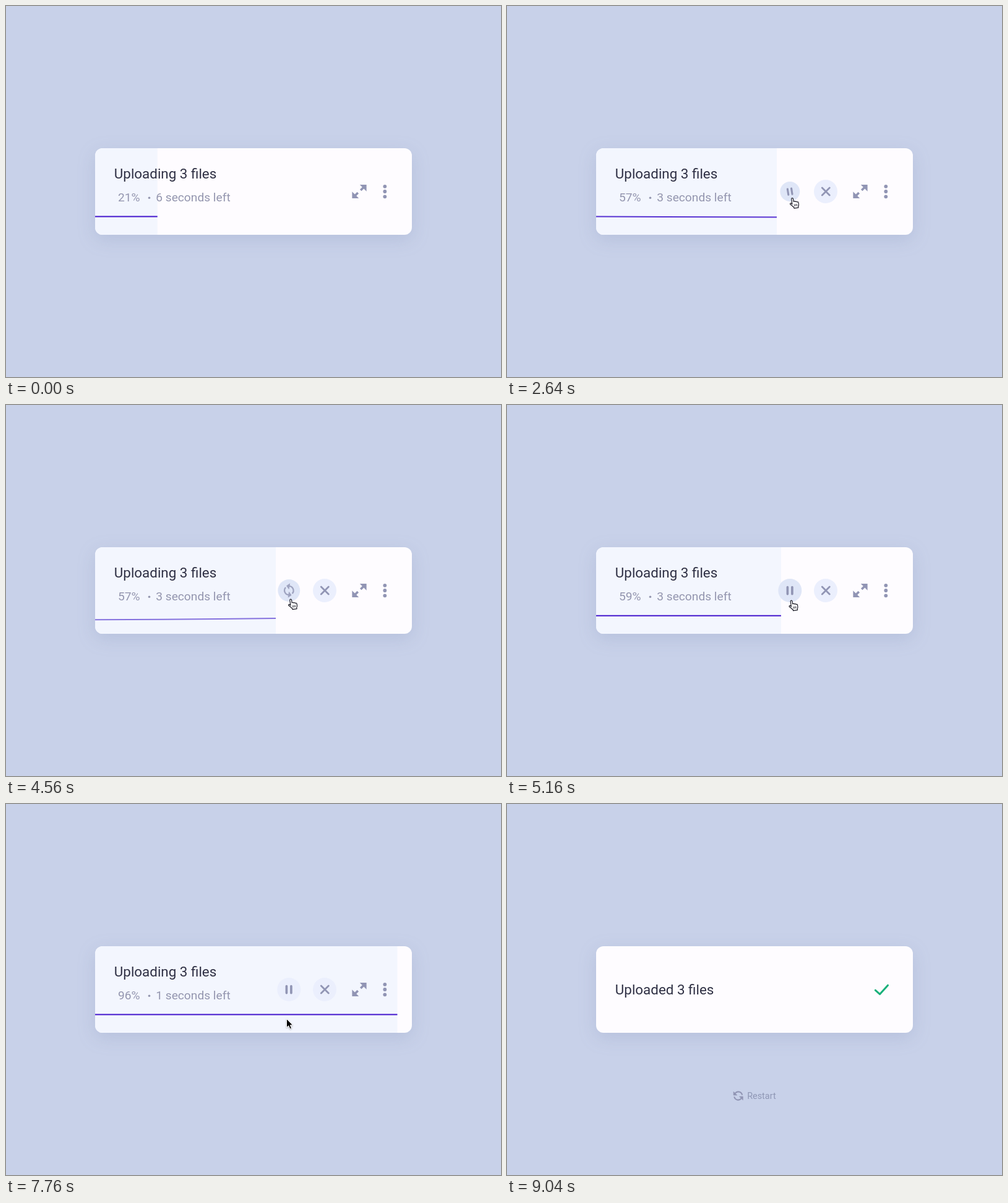
An HTML page for the animation above (9520 ms loop, 800 by 600 pixels).

```html
<!DOCTYPE html>
<html lang="en">
<head>
<meta charset="utf-8">
<title>Upload progress card</title>
<style>
  html, body { margin: 0; width: 100%; height: 100%; overflow: hidden; background: #c8d1e9; }
  svg { display: block; width: 800px; height: 600px; }
  text { font-family: Roboto, sans-serif; white-space: pre; }
  .shadow { filter: drop-shadow(0 8px 14px rgba(95, 110, 160, .17)); }
  .title { font-size: 22.4px; fill: #2f3044; }
  .sub { font-size: 19.2px; fill: #9496af; }
  .icon { fill: #9195b4; }
  .stroke { fill: none; stroke: #9195b4; stroke-linecap: round; }
  #arrow { filter: drop-shadow(0 1px 1px rgba(0, 0, 0, .3)); }
</style>
</head>
<body>
<svg viewBox="0 0 800 600">
  <defs>
    <clipPath id="cardClip"><rect x="144" y="230" width="512" height="140" rx="12"/></clipPath>
    <g id="half">
      <path d="M-8.8 -7.8V-1.3H-2.2Z" class="icon" stroke="#9195b4" stroke-width=".8" stroke-linejoin="round"/>
      <path d="M-6 -4.6A7.6 7.6 0 0 1 7.5 -1.6" class="stroke" stroke-width="2.4" style="stroke-linecap:butt"/>
    </g>
    <g id="sync"><use href="#half"/><use href="#half" transform="rotate(180)"/></g>
    <g id="expandArrow">
      <path d="M.8 -11H11.6V-.2Z" class="icon"/>
      <path d="M2.2 -2L8 -7.8" class="stroke" stroke-width="3.6" style="stroke-linecap:butt"/>
    </g>
  </defs>

  <rect class="shadow" x="144" y="230" width="512" height="140" rx="12" fill="#fefcff"/>

  <g id="uploading">
    <g clip-path="url(#cardClip)">
      <rect id="fill" x="144" y="230" height="140" fill="#f3f6fe"/>
      <path id="line" fill="none" stroke-width="2"/>
    </g>
    <text class="title" x="174.8" y="279">Uploading 3 files</text>
    <text id="percent" class="sub" x="181" y="316.2"></text>
    <circle cx="231.5" cy="310.3" r="1.8" fill="#9496af"/>
    <text id="status" class="sub" x="242.2" y="316.2"></text>

    <g id="buttons">
      <g id="toggle">
        <circle id="toggleDisc" r="19"/>
        <g id="pauseIcon" class="stroke" stroke-width="3.7">
          <path d="M-3.9 -5.4V5.6M3.6 -5.4V5.6"/>
        </g>
        <use id="syncIcon" href="#sync"/>
      </g>
      <circle cx="515" cy="300" r="19" fill="#ebeffd"/>
      <path d="M509.3 294L521.3 306M521.3 294L509.3 306" class="stroke" stroke-width="2.7"/>
    </g>

    <g transform="translate(571 300)">
      <use href="#expandArrow"/><use href="#expandArrow" transform="rotate(180)"/>
    </g>
    <g class="icon">
      <circle cx="612.3" cy="291.8" r="2.9"/>
      <circle cx="612.3" cy="300" r="2.9"/>
      <circle cx="612.3" cy="308.3" r="2.9"/>
    </g>
  </g>

  <g id="uploaded">
    <text class="title" x="174.8" y="308">Uploaded 3 files</text>
    <path id="check" d="M595.3 301.2L602.6 307.6L615.5 293.2" pathLength="1" stroke-dasharray="1 2"
      fill="none" stroke="#18b07a" stroke-width="3" stroke-linecap="round" stroke-linejoin="round"/>
  </g>

  <g id="restart">
    <use href="#sync" transform="translate(373.7 472) scale(.86)"/>
    <text x="388.2" y="477.2" font-size="14.4" fill="#8f97b5">Restart</text>
  </g>

  <g id="cursor">
    <path id="arrow" d="M0 0V14L3.2 11.1L5.5 16.2L8 15.1L5.8 10.2H10Z" stroke="#fff" stroke-width="1"/>
    <g id="hand" transform="rotate(-8) translate(-4.6 0)" stroke="#1b1b26" stroke-width="1.2" stroke-linejoin="round">
      <path fill="#fff" d="M4 10.6V2.2Q4 .7 5.4 .7Q6.8 .7 6.8 2.2V6.6Q9 5.7 9.6 7.3Q11.7 6.6 12.2 8.2Q14.4 7.6 14.4 9.7V12Q14.4 14 13.2 15.5V17.5H6.2V16Q4.4 14.6 3.3 12.6L.9 10.3Q.6 8.7 2 8.5Q3 8.6 4 10.6Z"/>
      <path fill="none" stroke-width=".8" d="M7.3 11V14.5M9.3 11V14.5M11.3 11V14.5"/>
    </g>
  </g>
</svg>
<script>
  const LOOP = 9520, STEP = 40;
  const RATE = 0.01424;            // percent per ms
  const PAUSE = 2523, RESUME = 4965;
  const PAUSE_RELEASE = 2610, RESUME_RELEASE = 4420;
  const DONE = 8080;

  const el = {};
  document.querySelectorAll('svg [id]').forEach(node => el[node.id] = node);

  const clamp = x => Math.min(1, Math.max(0, x));
  const ramp = (t, from, to) => clamp((t - from) / (to - from));
  const smooth = x => x * x * (3 - 2 * x);
  const easeOut = x => 1 - (1 - x) ** 1.7;
  const linear = x => x;
  const mix = (a, b, k) => a + (b - a) * k;
  const mixColor = (a, b, k) => `rgb(${a.map((c, i) => Math.round(mix(c, b[i], k)))})`;
  const fade = (node, opacity) => node.setAttribute('opacity', opacity);

  // Underdamped spring from 0 to 1, starting at rest.
  function spring(ms) {
    if (ms <= 0) return 0;
    const s = ms / 1000, k = 5.2, w = 10.5;
    return 1 - Math.exp(-k * s) * (Math.cos(w * s) + k / w * Math.sin(w * s));
  }

  function progress(t) {
    const active = Math.min(t, PAUSE) + Math.max(0, t - RESUME);
    return Math.min(100, 21.1 + RATE * active);
  }

  // time, x, y, easing of the way to this point
  const path = [
    [960, 788, 342, linear], [1200, 687, 341.5, linear], [1800, 459, 314, easeOut],
    [2250, 459, 314, linear], [2440, 460, 310, smooth], [2640, 460, 310, linear],
    [2800, 459, 314, smooth], [4060, 459, 314, linear], [4280, 460, 310, smooth],
    [4440, 460, 310, linear], [4640, 458.5, 315.5, smooth], [5400, 458.5, 315.5, linear],
    [6200, 453.5, 347.5, smooth], [8200, 453.5, 347.5, linear], [9000, 772, 369, smooth]
  ];

  function cursorAt(t) {
    const next = path.findIndex(p => p[0] > t);
    if (next === 0) return path[0].slice(1, 3);
    if (next < 0) return path[path.length - 1].slice(1, 3);
    const [t0, x0, y0] = path[next - 1], [t1, x1, y1, ease] = path[next];
    const k = ease(ramp(t, t0, t1));
    return [mix(x0, x1, k), mix(y0, y1, k)];
  }

  function drawProgress(t) {
    const value = progress(t);
    const width = 5.12 * progress(t - 100);
    const paused = t > 2660 && t < 4460;
    const seconds = Math.max(1, Math.ceil((100 - value) / 14.35));
    el.percent.textContent = Math.floor(value) + '%';
    el.status.textContent = paused ? 'Paused' : seconds + ' seconds left';
    el.fill.setAttribute('width', width);

    const drop = lag => spring(t - PAUSE_RELEASE - lag) - spring(t - RESUME_RELEASE - lag);
    const left = 340.5 + 16 * drop(20), right = 340.5 + 16 * drop(0);
    const dim = ramp(t, 2600, 2860) - ramp(t, 4430, 4680);
    el.line.setAttribute('d', `M144 ${left}Q${144 + width / 2} ${left} ${144 + width} ${right}`);
    el.line.setAttribute('stroke', mixColor([67, 22, 205], [205, 213, 240], dim));
  }

  function drawButtons(t) {
    fade(el.buttons, smooth(ramp(t, 1270, 1500)));
    const press = smooth(ramp(t, 2250, 2440)) - smooth(ramp(t, 2640, 2840))
                + smooth(ramp(t, 4060, 4280)) - smooth(ramp(t, 4440, 4640));
    const hover = ramp(t, 1740, 1900) - ramp(t, 5520, 5720);
    const swap = smooth(ramp(t, 2590, 2960)) - smooth(ramp(t, 4420, 4800));
    el.toggle.setAttribute('transform', `translate(457.3 300) scale(${1 - .16 * press})`);
    el.toggleDisc.setAttribute('fill', mixColor([235, 239, 253], [223, 230, 247], hover));
    el.pauseIcon.setAttribute('transform', `rotate(${-180 * swap})`);
    el.syncIcon.setAttribute('transform', `rotate(${180 - 180 * swap})`);
    fade(el.pauseIcon, 1 - ramp(swap, .25, .6));
    fade(el.syncIcon, ramp(swap, .4, .75));
  }

  function drawCursor(t) {
    const [x, y] = cursorAt(t);
    const pointing = Math.hypot(x - 457, y - 300) < 19;
    el.cursor.setAttribute('transform', `translate(${x} ${y})`);
    fade(el.cursor, ramp(t, 960, 1040) - ramp(t, 8920, 9040));
    fade(el.hand, pointing ? 1 : 0);
    fade(el.arrow, pointing ? 0 : 1);
  }

  function drawResult(t) {
    fade(el.uploading, 1 - ramp(t, DONE, 8240));
    fade(el.uploaded, ramp(t, 8180, 8440));
    el.check.setAttribute('stroke-dashoffset', 1 - smooth(ramp(t, 8180, 8520)));
    fade(el.restart, ramp(t, DONE, 8240));
  }

  function frame() {
    const t = Math.floor(performance.now() % LOOP / STEP) * STEP;
    drawProgress(t);
    drawButtons(t);
    drawCursor(t);
    drawResult(t);
    requestAnimationFrame(frame);
  }
  frame();
</script>
</body>
</html>
```
